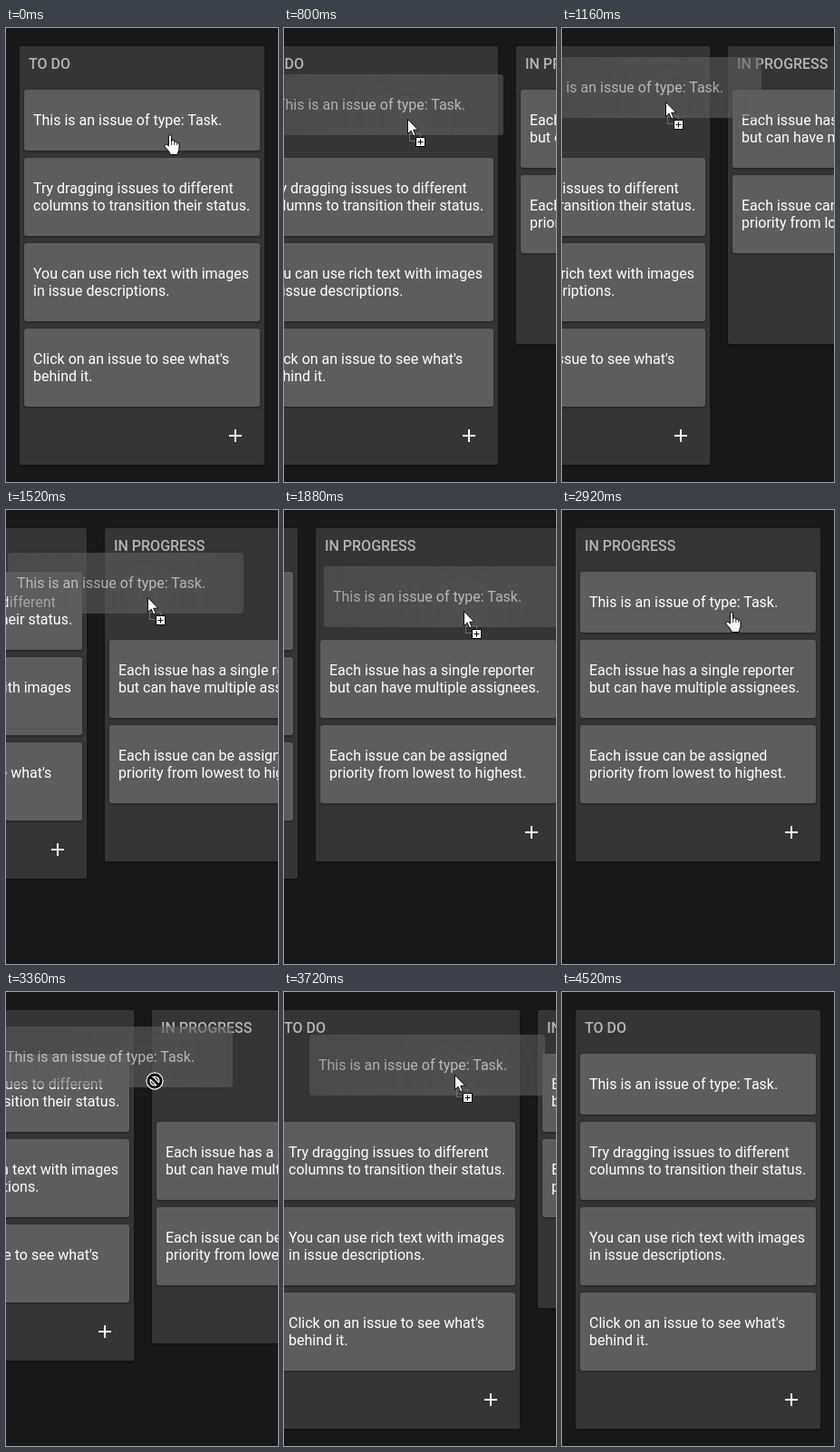
An HTML page for the animation above (4.88 s loop, 300 px wide and 500 px high).

```html
<!DOCTYPE html>
<html lang="en">
<head>
<meta charset="utf-8">
<title>Board</title>
<style>
  html, body { margin: 0; width: 100%; height: 100%; overflow: hidden; }
  body { position: relative; background: #191919; color: #fff; font: 16px/19px Roboto, Arial, sans-serif; }
  #board { position: absolute; left: 15px; top: 20px; display: flex; align-items: flex-start; gap: 20px; }
  .col {
    position: relative; box-sizing: border-box; flex: none;
    width: 270px; min-height: 328px; padding: 48px 5px 56px;
    background: #353535; border-radius: 2px;
    box-shadow: 0 1px 3px rgba(0, 0, 0, .35);
  }
  h2 { position: absolute; left: 10px; top: 10px; margin: 0; font: inherit; font-weight: 500; color: #b4b4b4; }
  .card {
    box-sizing: border-box; width: 260px; padding: 24px 0 24px 10px; margin-bottom: 8px;
    background: #5d5d5d; border-radius: 3px; white-space: nowrap;
    box-shadow: 0 1px 3px rgba(0, 0, 0, .4);
  }
  .add { position: absolute; right: 20px; bottom: 20px; width: 24px; height: 24px; fill: #fff; }
  #ghost { position: absolute; left: 0; top: 0; margin: 0; box-shadow: none; }
  #cursor { position: absolute; left: 0; top: 0; width: 32px; height: 34px; overflow: visible; }
</style>
</head>
<body>
<div id="board">
  <section class="col">
    <h2>TO DO</h2>
    <div class="card task">This is an issue of type: Task.</div>
    <div class="card">Try dragging issues to different<br>columns to transition their status.</div>
    <div class="card">You can use rich text with images<br>in issue descriptions.</div>
    <div class="card">Click on an issue to see what's<br>behind it.</div>
    <svg class="add" viewBox="0 0 24 24"><path d="M19 13h-6v6h-2v-6H5v-2h6V5h2v6h6z"/></svg>
  </section>
  <section class="col">
    <h2>IN PROGRESS</h2>
    <div class="card task">This is an issue of type: Task.</div>
    <div class="card">Each issue has a single reporter<br>but can have multiple assignees.</div>
    <div class="card">Each issue can be assigned<br>priority from lowest to highest.</div>
    <svg class="add" viewBox="0 0 24 24"><path d="M19 13h-6v6h-2v-6H5v-2h6V5h2v6h6z"/></svg>
  </section>
</div>
<div id="ghost" class="card">This is an issue of type: Task.</div>
<svg id="cursor" viewBox="0 0 32 34">
  <g id="hand" fill="#fff" stroke="#000" stroke-linejoin="round">
    <path d="M5.4 13V2.2a1.6 1.6 0 0 1 3.2 0V8a1.6 1.6 0 0 1 3.2.2v.6a1.5 1.5 0 0 1 2.8.4v.7a1.4 1.4 0 0 1 2.4 1v4.6c0 3-1.8 4-1.8 7H7.2C7 19.8 4 17 1.2 13.8 .2 12 2.4 10.4 3.8 11.6z"/>
    <path d="M8.6 8v4M11.8 9v3M14.6 10v2" fill="none" stroke-width=".8"/>
  </g>
  <g id="copy">
    <rect x="2.5" y="16.5" width="12" height="8" fill="none" stroke="#000"/>
    <rect x="2.5" y="16.5" width="12" height="8" fill="none" stroke="#ddd" stroke-dasharray="1 1"/>
    <path d="M.5 .5V16.6L4.2 13.2 6.7 19 9.2 18 6.7 12.2H11.8z" fill="#fff" stroke="#000" stroke-width=".9"/>
    <path d="M9.5 20.5h10v10h-10z" fill="#fff" stroke="#000"/>
    <path d="M14.5 22.5v6M11.5 25.5h6" stroke="#000"/>
  </g>
  <g id="deny" fill="none">
    <path id="ban" d="M7 16a7 7 0 1 1 14 0a7 7 0 1 1-14 0M9.3 11.3l9.4 9.4" stroke="#fff" stroke-width="5"/>
    <use href="#ban"/>
    <path d="M7 16a7 7 0 1 1 14 0a7 7 0 1 1-14 0M9.3 11.3l9.4 9.4" stroke="#000" stroke-width="3"/>
  </g>
</svg>
<script>
const LOOP = 4880, STEP = 40, PITCH = 290;
const $ = id => document.getElementById(id);
const board = $('board'), ghost = $('ghost'), cursor = $('cursor');
const tasks = [...document.querySelectorAll('.task')];
const shapes = ['hand', 'copy', 'deny'].map($);

// Pointer path: time, x, y
const path = [
  [0, 174, 117], [580, 174, 117], [800, 136, 100], [1160, 114, 81],
  [1880, 198, 111], [2200, 180, 104], [2320, 180, 104], [2360, 180, 112],
  [2920, 180, 112], [3360, 150, 82], [3960, 208, 96], [4000, 208, 96], [4240, 16, 268]
];

// Drags: start, end and grab point inside the card
const drags = [
  { from: 600, to: 2160, dx: 154, dy: 49 },
  { from: 2960, to: 3960, dx: 160, dy: 44 }
];

const clamp = v => Math.min(1, Math.max(0, v));
const ramp = (t, a, b) => clamp((t - a) / (b - a));

function rate(i, k) {
  const a = path[i], b = path[i + 1];
  return a && b ? (b[k] - a[k]) / (b[0] - a[0]) : 0;
}

// Smooth slope without overshoot
function slope(i, k) {
  const a = rate(i - 1, k), b = rate(i, k);
  return a * b > 0 ? 2 * a * b / (a + b) : 0;
}

function along(t, k) {
  let i = 0;
  while (i < path.length - 2 && t >= path[i + 1][0]) i++;
  const a = path[i], b = path[i + 1], d = b[0] - a[0];
  const u = clamp((t - a[0]) / d), v = 1 - u;
  return a[k] * v * v * (1 + 2 * u) + slope(i, k) * d * u * v * v
       + b[k] * u * u * (3 - 2 * u) - slope(i + 1, k) * d * u * u * v;
}

function move(el, x, y) {
  el.style.transform = `translate(${Math.round(x)}px, ${Math.round(y)}px)`;
}

function draw(t) {
  const scroll = Math.round(PITCH * (ramp(t, 563, 1977) - ramp(t, 2920, 3794)));
  const x = Math.round(along(t, 1)), y = Math.round(along(t, 2));
  const drag = drags.find(d => t >= d.from && t < d.to);
  const leftEnd = 285 - scroll, rightStart = 305 - scroll;

  // The slot follows the last column under the pointer
  const owner = t < 2160 ? (t >= 600 && x > rightStart ? 1 : 0)
              : t < 3960 ? (t >= 2960 && x < leftEnd ? 0 : 1) : 0;
  tasks.forEach((el, i) => {
    el.style.display = i === owner ? 'block' : 'none';
    el.style.visibility = drag ? 'hidden' : 'visible';
  });
  move(board, -scroll, 0);

  ghost.style.display = drag ? 'block' : 'none';
  if (drag) {
    move(ghost, x - drag.dx, y - drag.dy);
    const mask = `radial-gradient(circle at ${drag.dx}px ${drag.dy}px, rgba(0,0,0,.67), rgba(0,0,0,.53) 170px)`;
    ghost.style.webkitMaskImage = ghost.style.maskImage = mask;
  }

  const shape = !drag ? 0 : x >= leftEnd && x <= rightStart ? 2 : 1;
  shapes.forEach((el, i) => { el.style.display = i === shape ? 'inline' : 'none'; });
  cursor.style.display = t < 4280 ? 'block' : 'none';
  move(cursor, x, y);
}

const start = performance.now();
function tick() {
  const t = (performance.now() - start) % LOOP;
  draw(Math.floor(t / STEP) * STEP);
  requestAnimationFrame(tick);
}
tick();
</script>
</body>
</html>
```
